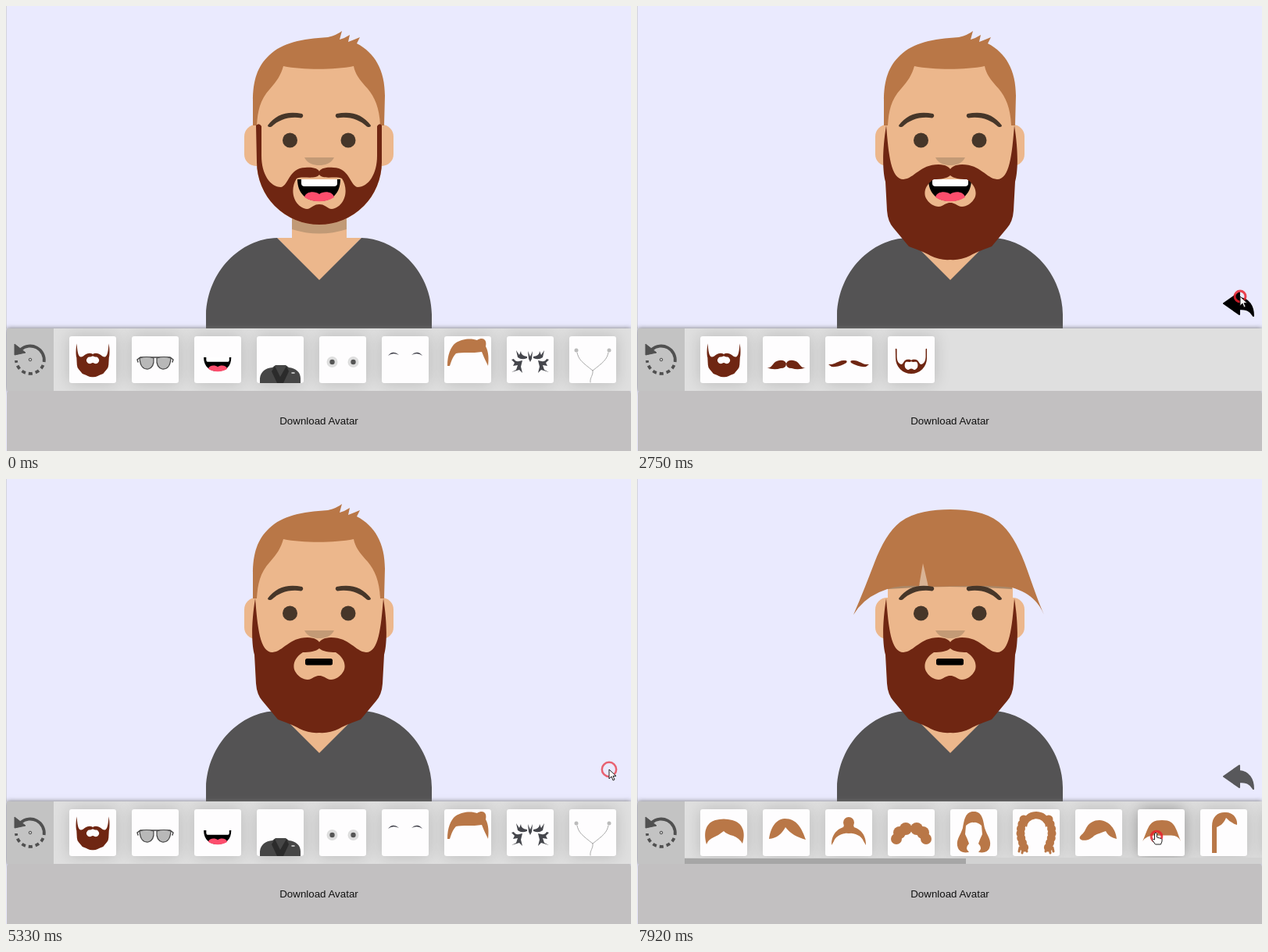
Recreate the animation shown at these times as an HTML page. Size 800 by 570 pixels, loop 8 s.

```html
<!DOCTYPE html>
<html>
<head>
<meta charset="utf-8">
<style>
html, body { margin: 0; width: 100%; height: 100%; overflow: hidden; background: #eaeafe }
#stage { position: relative; width: 800px; height: 570px; overflow: hidden }
svg { position: absolute; left: 0; top: 0 }
#edge { position: absolute; width: 1px; height: 413px; background: #d3d3dc }
#bar { position: absolute; left: 1px; top: 413px; width: 799px; height: 80px; background: #dfdfdf; box-shadow: 0 0 6px #707070 }
.panel { position: absolute; left: 60px; top: 0; width: 739px; height: 80px; overflow: hidden }
.card { position: absolute; top: 10px; width: 60px; height: 60px; border-radius: 3px; background: #fefdfe; box-shadow: 0 0 20px rgba(0,0,0,.17) }
.card.hot { box-shadow: 0 0 20px rgba(0,0,0,.36) }
.scroll { position: absolute; left: 0; bottom: 0; width: 100%; height: 8px; background: #d2d2d2 }
.scroll div { height: 7px; margin-top: 1px; background: #a6a6a6 }
#reset { position: absolute; width: 60px; height: 80px; background: #c3c3c3 }
#load { position: absolute; left: 1px; top: 493px; width: 799px; height: 77px; border-radius: 4px 4px 0 0; background: #c2c0c1;
  font: 13.333px/78px Arial, "Liberation Sans", sans-serif; text-align: center; color: #111 }
</style>
</head>
<body>
<div id="stage">
<svg width="800" height="570">
  <defs>
    <path id="bigBeard" fill="#6f2612" fill-rule="evenodd" d="M319 153C322 190 325 222 341 222C355 221 362 203 386 203C395 203 400 207 401 209C402 207 407 203 416 203C440 203 447 221 461 222C477 222 480 190 483 153C489 190 487 215 484 225L482 262Q481 276 474 284L454 308Q432 316 426 320Q414 326 401 325Q388 326 376 320Q370 316 348 308L328 284Q321 276 320 262L318 225C315 215 313 190 319 153ZM380 222C370 228 367 237 369 244C372 252 380 257 386 257C392 257 394 252 401 252C408 252 410 257 416 257C422 257 430 252 433 244C435 237 432 228 422 222C414 222 405 221 401 217C397 221 388 222 380 222Z"/>
    <path id="shortBeard" fill="#6f2612" fill-rule="evenodd" d="M320 153Q324 149 327 154V192C327 215 338 232 352 232C362 230 362 207 383 207C394 206 400 209 401 212C402 209 408 206 419 207C440 207 440 230 450 232C464 232 475 215 475 192V154Q478 149 481 153V200A80 80 0 0 1 321 200ZM372 221C364 233 366 253 381 259C390 263 391 254 401 254C411 254 412 263 421 259C436 253 438 233 430 221C423 217 406 223 401 216C396 223 379 217 372 221Z"/>
    <g id="laugh">
      <path d="M373 222H428C428 240 417 250 401 250C384 250 373 240 373 222Z"/>
      <path fill="#fff" d="M378 222H424V227Q424 231 420 231H382Q378 231 378 227Z"/>
      <path fill="#fd4e6d" d="M382 245C384 237 396 237 401 241C406 237 418 237 420 245C410 252 392 252 382 245Z"/>
    </g>
    <path id="helmet" d="M277 174C287 151 296 128 304 107C313 84 323 66 337 55C355 42 378 39 401 39C424 39 446 42 463 55C477 66 487 84 496 107C504 128 511 151 521 174C513 155 500 145 480 139C455 136 420 137 373 138L366 108L361 137Q330 135 310 145Q288 155 277 174Z"/>
    <path id="swoop" d="M6 38C4 34 11 32 13 26C17 17 24 14 31 14C44 15 52 26 53 38C46 36 42 34 39 28C34 30 29 31 24 34C20 39 10 42 6 38Z"/>
    <path id="brow" fill="#463629" d="M335 153C345 139 360 134 379 138Q382 141 378 143.500C362 141 349 146 340 154.500Q335 156 335 153Z"/>
  </defs>
  <rect x="305" y="152" width="191" height="53" rx="15" fill="#ecb78c"/>
  <path fill="#ecb78c" d="M366 260H436V297H455L401 352L347 297H366Z"/>
  <path fill="#c19a76" d="M366 270H436V286Q401 297 366 286Z"/>
  <path fill="#545354" d="M256 413V395C258 340 300 298 347 297L401 351L455 297C500 298 544 340 545 395V413Z"/>
  <path fill="#ecb78c" d="M321 130C321 85 355 65 401 65C447 65 481 85 481 130V200A80 80 0 0 1 321 200Z"/>
  <path fill="#c39a76" d="M382 194H420C416 202 408 204 401 204C394 204 386 202 382 194Z"/>
  <g id="hair" fill="#b97747">
    <path d="M316 153V122C316 95 322 77 337 63C354 47 378 42 412 40Q424 37 430 32L427 43Q434 41 440 37L438 46Q446 43 453 40L449 48C472 60 485 82 485 115L484 153H479C478 130 472 117 463 106C452 94 447 87 445 77C420 82 380 82 355 77C352 88 347 96 338 106C325 120 322 135 321 153Z"/>
    <use href="#swoop" transform="translate(251 -31) scale(5)"/>
    <g><path fill="#aa8767" d="M321 134H480V141Q400 135 321 141Z"/><path fill="#d9b394" d="M366 108L373 137H361Z"/><use href="#helmet"/></g>
  </g>
  <use href="#brow"/><use href="#brow" transform="matrix(-1 0 0 1 802 0)"/>
  <circle cx="363.5" cy="172" r="9.5" fill="#463629"/><circle cx="438" cy="172" r="9.5" fill="#463629"/>
  <g id="mouth"><use href="#laugh"/><rect x="383" y="230" width="35" height="8.500" rx="2.500"/></g>
  <g id="beard"><use href="#shortBeard"/><use href="#bigBeard"/></g>
  <path id="back" stroke-width="2" stroke-linejoin="round" d="M751 381L771 367V374C783 375 789 384 789 397C785 390 780 388 771 388V395Z"/>
</svg>
<div id="edge"></div>
<div id="bar">
  <div id="reset"><svg width="60" height="80" fill="none" stroke="#505050" stroke-width="3.800">
    <path d="M18 27A18 18 0 0 1 47.700 43"/>
    <path d="M46.500 47A18 18 0 0 1 12 41" stroke-dasharray="5 4"/>
    <path d="M10 20V34L24 31Z" fill="#505050" stroke-width="1"/>
    <circle cx="30" cy="40" r="1.800" stroke-width="1"/>
  </svg></div>
</div>
<div id="load">Download Avatar</div>
<svg width="800" height="570">
  <circle id="ring" fill="none" stroke="#e8202c"/>
  <g id="cursor" fill="#fff" stroke="#222" stroke-linejoin="round">
    <path d="M-1.500 8V1Q0 -1 1.500 1V6L7 7.500Q8.500 8 8 11L6.500 15H-.5L-4.500 9.500Q-4 7.500 -1.500 9Z"/>
    <path d="M0 0V12L3 9L5 14L7 13L5 8.500H9Z"/>
  </g>
</svg>
</div>
<script>
const $ = id => document.getElementById(id);
const fill = (d, c = '#6f2612') => `<path d="${d}" fill="${c}"/>`;
const line = (d, w = 3, c = '#000') => `<path d="${d}" fill="none" stroke="${c}" stroke-width="${w}" stroke-linecap="round"/>`;
const dot = (x, y, r, c) => `<circle cx="${x}" cy="${y}" r="${r}" fill="${c}"/>`;
const use = (id, x, y, s) => `<use href="#${id}" transform="translate(${x} ${y}) scale(${s})"/>`;
const mirror = s => s + `<g transform="matrix(-1 0 0 1 60 0)">${s}</g>`;
const hair = d => fill(d, '#b97747');
const pink = '#fd4e6d';

const fullBeard = use('bigBeard', -70.2, -29, .25);
const laugh = use('laugh', -226.6, -115, .64);
const tribal = 'M30 26L27 19L28 29L30 33ZM26 26Q18 25 18 19L16 24L12 18L14 27Q19 31 26 28ZM20 31Q11 34 9 29L6 30L10 34L8 38L14 37L12 43L6 46L16 43L20 47L18 39Z';
const ringlets = Array.from({length: 7}, (_, i) =>
  dot(14 - 4 * Math.sin(i * .55), 13 + i * 6, 5.5, '#b97747')).join('');

const panels = {
  main: [
    fullBeard,
    line('M8 33L7 30L11 27H49L53 30L52 33', 1.4, '#444') + mirror('<path d="M10 28Q19 25 28 28Q29 40 21 42Q11 43 10 28Z" fill="#b8b8b8" stroke="#444" stroke-width="1.2"/>'),
    laugh,
    fill('M4 60V54C5 45 11 41 20 40L24 37H37L41 40C50 41 56 46 56 54V60Z', '#464646') + fill('M23 38L30 52L38 38L41 45L34 60H26L19 45Z', '#2b2b2b') + line('M45 47H48', 1.5, '#ddd'),
    mirror(dot(16.5, 33, 7, '#dedede') + dot(16.5, 33, 3.2, '#555')),
    mirror(fill('M8 25Q14 17 22 24Q14 20 8 25Z', '#3a3a44')),
    hair('M4 38C4 24 8 14 14 9C24 2 36 3 42 5C50 0 55 5 53 13C57 20 57 30 56 38C54 33 51 28 48 20C36 22 22 20 15 22C10 27 9 33 7 38Z'),
    mirror(fill(tribal, '#45464c')),
    mirror(line('M10 21C12 30 16 33 30 44', 1, '#aaa') + dot(9, 18, 2.5, '#bbb')) + line('M30 44C31 50 26 53 27 59', 1, '#aaa')
  ],
  beards: [
    fullBeard,
    mirror(fill('M5 40C13 42 12 32 21 31Q28 30 30 35Q30 41 23 41Q14 44 5 40Z')),
    mirror(fill('M4 36C13 37 17 30 25 31Q29 31 27 34Q17 40 8 39Z')),
    use('shortBeard', -70.2, -22, .25)
  ],
  mouths: [
    fill('M15 35C16 16 44 16 45 35Z', '#000') + fill('M18 27Q30 14 42 27Z', '#fff') + line('M18 25Q30 14 42 25', 1, '#777') + fill('M17 34Q30 28 44 34V43Q41 48 37 43L33 39Q28 37 25 43Q20 48 17 43Z', '#80b944'),
    line('M20.500 30Q30 42 39.500 30', 3.2),
    fill('M12 28H48Q48 41 36 41H24Q12 41 12 28Z', '#000') + fill('M18 28H43V34H18Z', '#fff') + fill('M22 37Q30 31 38 37V44Q37 51 30 51Q23 51 22 44Z', pink),
    fill('M15 28H45Q44 43 30 43Q16 42 15 28Z', '#000') + fill('M18 28H43V33H18Z', '#fff') + fill('M19 38Q26 32 30 36Q36 32 40 38Q31 46 19 38Z', pink),
    line('M23 34H37', 4.5),
    fill('M15 43C14 16 46 16 45 43Z', '#000') + fill('M19 27Q30 18 41 27Z', '#fff') + fill('M17 42Q22 32 30 37Q39 32 43 42Z', pink),
    '<rect x="10.500" y="25" width="39" height="15" rx="7" fill="#fff" stroke="#000" stroke-width="2"/>' + line('M12 33H48M17 26V39M24 26V39M30 26V39M37 26V39M43 26V39', 1, '#888'),
    mirror(dot(9, 35, 6.5, '#efb999') + line('M13 31Q18 34 15 40', 2.2)) + line('M17 37Q30 42 43 37', 3),
    fill('M17 43C17 25 43 25 43 43Z', '#000'), ''
  ],
  hairs: [
    hair('M8 45C3 27 9 17 19 14Q30 11 41 14C53 17 59 28 54 44Q50 37 42 34Q34 32 30 28Q24 33 17 36Q10 39 8 45Z'),
    hair('M8 38C10 24 16 13 28 12C44 12 50 25 55 39C44 36 35 31 29 23C24 32 18 37 8 38Z'),
    dot(30, 17, 7, '#b97747') + dot(30, 24, 7, '#b97747') + hair('M8 46C7 14 53 14 52 46L49 41C44 27 16 27 11 41Z'),
    mirror(dot(23, 25, 8, '#b97747') + dot(15, 30, 8, '#b97747') + dot(11, 38, 7, '#b97747')),
    mirror(hair('M31 3C20 2 18 12 16 24C13 34 6 40 10 50Q13 57 24 55Q18 50 24 44Q22 38 19 32L20 21Q26 16 31 17Z')),
    mirror(ringlets + hair('M31 3Q15 3 13 18L18 23Q19 13 31 12Z') + line('M9 49L8 54M13 50L12 56M17 49L18 54', 3, '#b97747')),
    `<g fill="#b97747">${use('swoop', 0, 0, 1)}</g>`,
    `<g fill="#b97747">${use('helmet', -49.2, 6.2, .2)}</g>`,
    hair('M15 56V22C15 8 24 3 33 4C42 4 48 12 47 20Q38 17 33 11C30 19 24 22 21 23V56Z'), ''
  ]
};
const thumbWidth = {mouths: 622, hairs: 360};
const views = {};
for (const name in panels) {
  const view = views[name] = document.createElement('div');
  view.className = 'panel';
  view.innerHTML = panels[name].map((art, i) =>
    `<div class="card" style="left:${20 + 80 * i}px"><svg width="60" height="60">${art}</svg></div>`).join('') +
    (thumbWidth[name] ? `<div class="scroll"><div style="width:${thumbWidth[name]}px"></div></div>` : '');
  $('bar').insertBefore(view, $('reset'));
}

// time, x, y of the pointer tip
const path = [
  [750, 735, 257], [1330, 134, 452], [1580, 134, 452], [1750, 118, 455], [2000, 118, 455], [2330, 700, 530],
  [2500, 772, 372], [2830, 772, 372], [3250, 270, 457], [3580, 270, 457], [3750, 340, 520],
  [4000, 418, 449], [4250, 418, 449], [4500, 595, 430], [4830, 735, 420], [5080, 772, 372], [5330, 772, 372],
  [6000, 577, 443], [6580, 577, 443], [6830, 585, 450], [7250, 585, 450], [7750, 664, 453], [8000, 664, 453]
];
const clicks = [[1410, 134, 449], [1900, 118, 453], [2660, 772, 372], [3330, 270, 460], [4080, 416, 449],
  [5160, 772, 372], [6080, 577, 440], [6910, 585, 450], [7830, 665, 458]];
const screens = [[0, 'main'], [1660, 'beards'], [2830, 'main'], [3410, 'mouths'], [5330, 'main'], [6330, 'hairs']];

const latest = (list, t) => list.filter(e => e[0] <= t).pop();
const show = (group, n) => [...group.children].forEach((el, i) => el.style.display = i === n ? '' : 'none');

function pointer(t) {
  const i = path.findIndex(p => p[0] > t);
  if (i < 1) return null;
  const [t0, x0, y0] = path[i - 1], [t1, x1, y1] = path[i];
  const u = (t - t0) / (t1 - t0), e = u * u * (3 - 2 * u);
  return [x0 + (x1 - x0) * e, y0 + (y1 - y0) * e];
}

function draw(now) {
  const t = Math.floor((now % 8000 + 5) * .012) / .012; // twelve steps a second
  const screen = latest(screens, t)[1];
  const p = pointer(t), [x, y] = p || [-99, -99];
  for (const name in views) views[name].style.display = name === screen ? '' : 'none';
  const cards = [...views[screen].querySelectorAll('.card')];
  const over = y >= 423 && y < 483 && x >= 81 && (x - 81) % 80 < 60 ? Math.floor((x - 81) / 80) : -1;
  cards.forEach((c, i) => c.classList.toggle('hot', i === over));

  show($('beard'), t >= 2000 ? 1 : 0);
  show($('mouth'), t >= 4160 ? 1 : 0);
  show($('hair'), t >= 7830 ? 2 : t >= 7080 ? 1 : 0);

  const ink = x > 750 && y > 360 && y < 400 ? '#000' : '#58585b';
  $('back').style.display = screen === 'main' ? 'none' : '';
  $('back').setAttribute('fill', ink);
  $('back').setAttribute('stroke', ink);

  $('cursor').setAttribute('transform', `translate(${x} ${y})`);
  show($('cursor'), !p ? -1 : cards[over] ? 0 : 1);

  const click = latest(clicks, t), age = click ? t - click[0] : 999;
  const ring = $('ring');
  ring.style.display = age < 460 ? '' : 'none';
  if (age < 460) {
    ring.setAttribute('cx', click[1]);
    ring.setAttribute('cy', click[2]);
    ring.setAttribute('r', 4.5 + age * .027);
    ring.setAttribute('stroke-width', 3.5 - age * .006);
    ring.setAttribute('opacity', 1 - age / 540);
  }
}
function tick() {
  draw(performance.now());
  requestAnimationFrame(tick);
}
tick();
</script>
</body>
</html>
```
